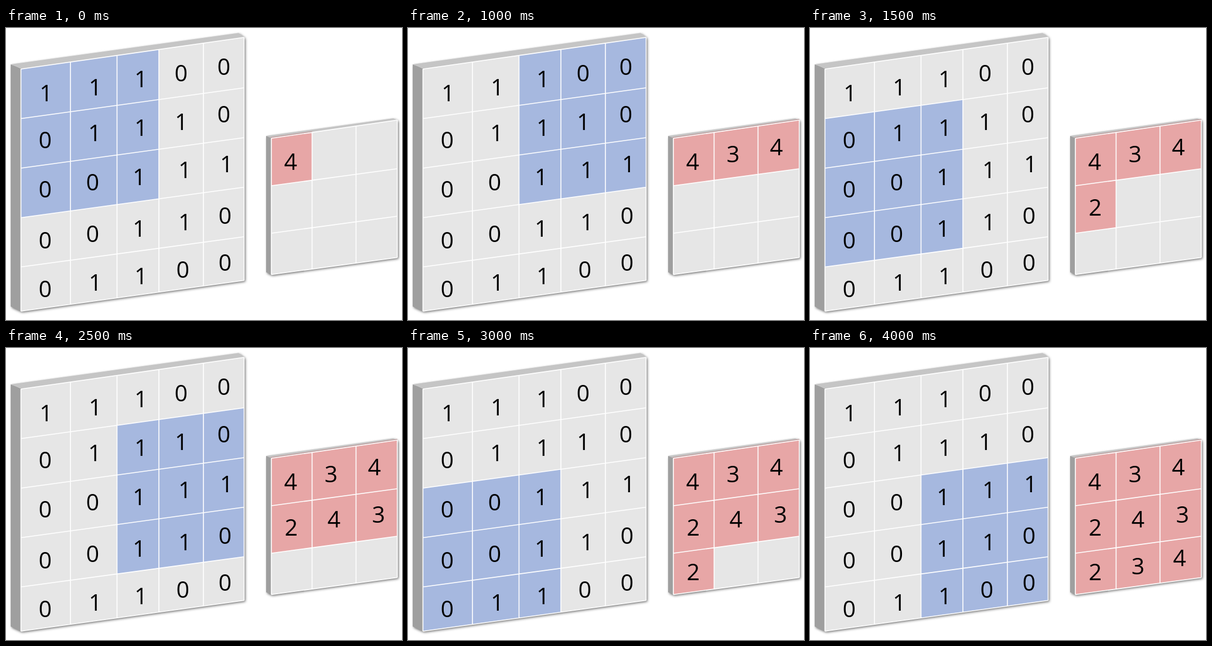
Animation of 676x498 px, one loop 4500 ms. Source, as an HTML page:

```html
<!DOCTYPE html>
<html lang="en">
<head>
<meta charset="utf-8">
<title>Convolution</title>
<style>
  html, body { margin: 0; width: 100%; height: 100%; overflow: hidden; background: #fff; }
  svg { display: block; width: 100%; height: 100%; }
  text { font: 39px "Open Sans", "Noto Sans", sans-serif; text-anchor: middle; fill: #000; }
  .slab { filter: drop-shadow(2px 2.5px 2px rgba(0, 0, 0, .6)); }
  .grid { stroke: #fff; stroke-width: 1.6; fill: none; }
</style>
</head>
<body>
<svg id="stage" viewBox="0 0 676 498"></svg>
<script>
const STEP = 500, STEPS = 9, DIGIT_RISE = 14;
const stage = document.getElementById('stage');

const input = {
  xs: [25.5, 110, 189.5, 261, 337, 406.5],
  left: [70, 154.5, 239, 323.5, 407.5, 483],
  right: [16, 102, 187, 271.5, 356, 430.5],
  back: [[8, 62], [397, 8.5], [8, 475]],
  values: ['11100', '01110', '00111', '00110', '01100'],
  spots: [
    [66, 111, 150, 101, 228, 87, 299, 77, 372, 66],
    [67, 191, 149, 179, 228, 170, 297, 160, 372, 147],
    [67, 275, 148, 263, 225, 254, 303, 242, 374, 232],
    [67, 362, 148, 351, 225, 342, 303, 331, 374, 320],
    [67, 445, 150, 434, 228, 423, 302, 412, 374, 400]
  ]
};
const output = {
  xs: [453, 522.5, 597.5, 668],
  left: [188, 269, 350, 420.5],
  right: [157, 240, 321, 391.5],
  back: [[444, 184], [661, 154], [444, 416.5]],
  values: ['434', '243', '234'],
  spots: [
    [486, 228, 555, 215, 629, 203],
    [487, 306, 560, 292, 636, 284],
    [487, 382, 560, 372, 631, 358]
  ]
};

function add(parent, tag, attrs) {
  const el = document.createElementNS('http://www.w3.org/2000/svg', tag);
  for (const key in attrs) el.setAttribute(key, attrs[key]);
  return parent.appendChild(el);
}

// Point where column line c crosses row line r.
function corner(b, c, r) {
  const k = (b.xs[c] - b.xs[0]) / (b.xs.at(-1) - b.xs[0]);
  return [b.xs[c], b.left[r] + (b.right[r] - b.left[r]) * k];
}

function block(b, c, r, size) {
  return [[c, r], [c + size, r], [c + size, r + size], [c, r + size]]
    .map(([x, y]) => corner(b, x, y)).join(' ');
}

function drawSlab(b) {
  const n = b.values.length;
  const g = add(stage, 'g', { class: 'slab' });
  const [topLeft, topRight, bottomLeft] = b.back;
  const poly = (points, fill) => add(g, 'polygon', { points: points.join(' '), fill });
  poly([topLeft, topRight, corner(b, n, 0), corner(b, 0, 0)], '#c5c5c5');
  poly([topLeft, corner(b, 0, 0), corner(b, 0, n), bottomLeft], '#9f9f9f');
  add(g, 'polygon', { points: block(b, 0, 0, n), fill: '#e6e6e6' });
  return add(stage, 'g', {});
}

function drawGrid(b) {
  const n = b.values.length;
  let d = '';
  for (let i = 0; i <= n; i++) {
    d += `M${corner(b, i, 0)}L${corner(b, i, n)}M${corner(b, 0, i)}L${corner(b, n, i)}`;
  }
  add(stage, 'path', { d, class: 'grid' });
}

function drawDigits(b) {
  return b.values.flatMap((row, r) => [...row].map((value, c) => {
    const nudge = value === '1' ? 2.5 : 0;
    const el = add(stage, 'text', {
      x: b.spots[r][2 * c] + nudge,
      y: b.spots[r][2 * c + 1] + DIGIT_RISE
    });
    el.textContent = value;
    return el;
  }));
}

const inputFill = drawSlab(input);
const kernel = add(inputFill, 'polygon', { fill: '#a6b8df' });
drawGrid(input);
drawDigits(input);

const outputFill = drawSlab(output);
const cells = Array.from({ length: STEPS }, (_, i) => add(outputFill, 'polygon', {
  points: block(output, i % 3, Math.floor(i / 3), 1), fill: '#e7a6a6'
}));
drawGrid(output);
const rim = add(stage, 'path', { stroke: '#bd8f8f', 'stroke-width': 1, fill: 'none' });
const results = drawDigits(output);

function render(time) {
  const step = Math.floor(time / STEP) % STEPS;
  kernel.setAttribute('points', block(input, step % 3, Math.floor(step / 3), 3));
  for (let i = 0; i < STEPS; i++) {
    const shown = i <= step ? 'visible' : 'hidden';
    cells[i].setAttribute('visibility', shown);
    results[i].setAttribute('visibility', shown);
  }
  const [x, y] = corner(output, Math.min(step + 1, 3), 0);
  rim.setAttribute('d', `M452 186.8L${x} ${y - 1.3}`);
}

const start = performance.now();
function tick() {
  render(performance.now() - start);
  requestAnimationFrame(tick);
}
tick();
</script>
</body>
</html>
```
